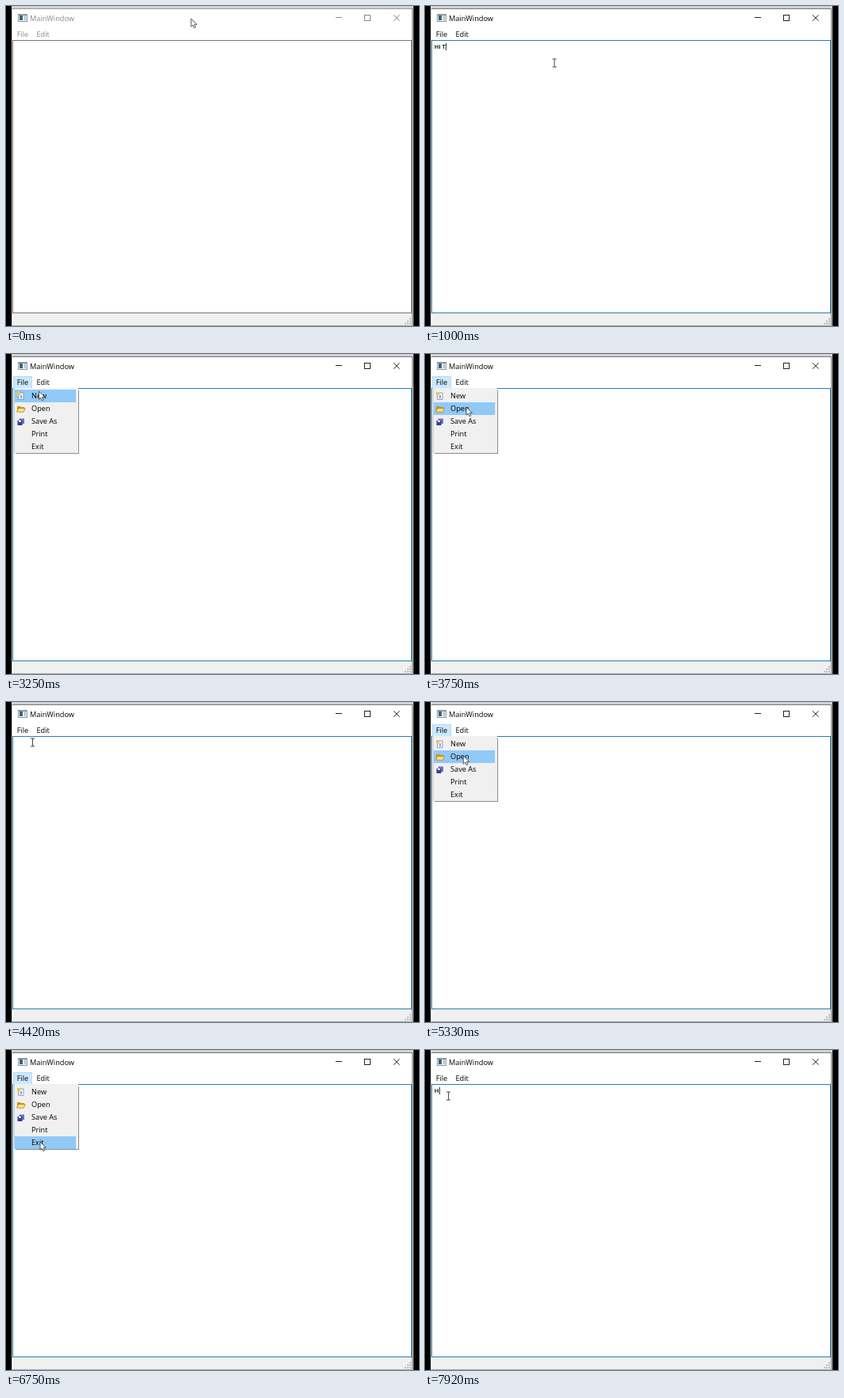
An HTML page for the animation above (8000 ms loop, 520x404 px).

```html
<!DOCTYPE html>
<html lang="en">
<head>
<meta charset="utf-8">
<style>
  html, body { margin: 0; width: 100%; height: 100%; overflow: hidden; background: #000; }
  svg { display: block; width: 520px; height: 404px; }
  text { font: 9.2px "Open Sans", "Noto Sans", sans-serif; fill: #000; white-space: pre; }
  #typed { font-size: 7.6px; font-weight: 600; }
  .crisp { shape-rendering: crispEdges; }
</style>
</head>
<body>
<svg viewBox="0 0 520 404">
  <rect width="520" height="404"/>
  <g class="crisp">
    <rect x="7" width="506" height="404" fill="#fff"/>
    <rect x="7" width="506" height="3" fill="#d2d2d2"/>
    <rect id="topEdge" x="8" y="3" width="504" height="1"/>
    <rect x="7" y="3" width="1" height="401" fill="#c4c4c4"/>
    <rect x="511" y="3" width="1" height="401" fill="#858585"/>
    <rect x="512" y="3" width="1" height="401" fill="#c4c4c4"/>
    <rect x="9" y="388" width="502" height="15" fill="#f0f0f0"/>
    <rect x="8" y="403" width="504" height="1" fill="#aaa"/>
    <g id="grip" fill="#bbb"></g>
    <rect id="focusFrame" x="8.5" y="43.5" width="502" height="344" fill="none"/>
  </g>
  <g class="crisp">
    <rect x="15" y="10" width="12" height="10" fill="#92989c"/>
    <rect x="16" y="12" width="10" height="7" fill="#eef2f4"/>
    <rect x="17" y="12" width="4" height="6" fill="#34687c"/>
    <rect x="23" y="12" width="2" height="6" fill="#b4c5ce"/>
  </g>
  <text id="title" x="30" y="18.7">MainWindow</text>
  <g id="buttons" fill="none">
    <path class="crisp" d="M415 14.5h8M451.5 11.5h7v7h-7z"/>
    <path d="M488 11.3l7.6 7.4M495.6 11.3l-7.6 7.4"/>
  </g>
  <rect id="fileHot" class="crisp" x="9.5" y="28.5" width="23" height="15" fill="#cce8ff" stroke="#b3dcf8"/>
  <text id="fileLabel" x="13.7" y="39">File</text>
  <text id="editLabel" x="38.5" y="39">Edit</text>
  <text id="typed" x="11.7" y="54.3"></text>
  <rect id="caret" class="crisp" y="47" width="1" height="9" fill="#333"/>
  <g id="menu">
    <g class="crisp">
      <rect x="12" y="46" width="80" height="80" fill="#8e8e8e"/>
      <rect x="10" y="43" width="81" height="82" fill="#f0f0f0"/>
      <rect x="10" y="43" width="1" height="82" fill="#ccc"/>
      <rect id="hover" x="11" width="77" height="16" fill="#91c9f7"/>
    </g>
    <g stroke-width=".7">
      <path d="M15.5 49h6.5v8.5h-6.5z" fill="#f4f6ff" stroke="#6b7ba8"/>
      <path d="M14 48h4v4h-4z" fill="#f0c544"/>
      <path d="M18 52h2v4h-2z" fill="#84a8dc"/>
      <path d="M14 66h4l1 1h4v6h-9z" fill="#c89522"/>
      <path d="M13.5 73l2.3-4.5h8.5L22 73.5z" fill="#ffe17b" stroke="#a97c1b"/>
      <path d="M16.5 81.5h6.5v6.5h-6.5z" fill="#6873bb"/>
      <path d="M14.5 84h6v6h-6z" fill="#343f8c"/>
      <path d="M16 84h3v2h-3z" fill="#e8ebfa"/>
    </g>
    <g id="items"></g>
  </g>
  <path id="arrow" d="M0 0V10.2L2.4 8L4 11.6L5.8 10.8L4.2 7.3H7.4Z" fill="#fff" stroke="#444" stroke-width=".9"/>
  <path id="beam" d="M-2.5 -5H2.5M0 -5V5M-2.5 5H2.5" fill="none" stroke="#444"/>
</svg>
<script>
const LOOP = 8000;
const $ = id => document.getElementById(id);
const set = (id, name, value) => $(id).setAttribute(name, value);
const show = (id, on) => set(id, "display", on ? "inline" : "none");

const menuItems = ["New", "Open", "Save As", "Print", "Exit"];
const rowTop = i => 45 + 16 * i;
$("items").innerHTML = menuItems.map((name, i) =>
  `<text x="32" y="${rowTop(i) + 11}">${name}</text>`).join("");

for (let row = 0; row < 3; row++)
  for (let col = 2 - row; col < 3; col++)
    $("grip").innerHTML += `<rect x="${502 + col * 3}" y="${394 + row * 3}" width="2" height="2"/>`;

// Each move ends at its arrival time; the pointer rests in between.
const MOVE_TIME = 330;
const fileButton = [22, 36];
const item = name => {
  const i = menuItems.indexOf(name);
  return [50 - 1.75 * i, rowTop(i) + 7];
};
const moves = [
  { at: 0, to: [233, 16] },
  { at: 580, to: [163, 72] },
  { at: 3080, to: fileButton },
  { at: 3350, to: item("New") },
  { at: 3560, to: fileButton },
  { at: 3750, to: [52, 67] },
  { at: 4000, to: fileButton },
  { at: 4420, to: [33.5, 51] },
  { at: 4920, to: fileButton },
  { at: 5300, to: item("Open") },
  { at: 5920, to: item("Save As") },
  { at: 6400, to: item("Print") },
  { at: 6750, to: item("Exit") },
  { at: 7330, to: fileButton },
  { at: 7660, to: [29.5, 58] }
];

const activation = 250, focusTime = 620;
const typingStart = 750, keyInterval = 72;
const clearTime = 3400, retypeTime = 7920;
const menuTimes = [[3120, clearTime], [3580, 4000], [5000, 7400]];

function pointerAt(t) {
  const i = moves.findLastIndex(move => move.at <= t);
  const from = moves[i], next = moves[i + 1] || { at: LOOP, to: from.to };
  const duration = Math.min(MOVE_TIME, next.at - from.at);
  const p = Math.max(0, 1 - (next.at - t) / duration);
  const ease = p * p * (3 - 2 * p);
  return from.to.map((v, axis) => v + (next.to[axis] - v) * ease);
}

function textAt(t) {
  if (t >= retypeTime) return "H";
  if (t < typingStart || t >= clearTime) return "";
  return "Hi There!".slice(0, 1 + Math.floor((t - typingStart) / keyInterval));
}

function render(t) {
  const [x, y] = pointerAt(t);
  const active = t >= activation, focused = t >= focusTime;
  const menuOpen = menuTimes.some(([start, end]) => t >= start && t < end);
  for (const id of ["title", "fileLabel", "editLabel"])
    $(id).style.fill = active ? "#000" : "#8a8a8a";
  set("buttons", "stroke", active ? "#222" : "#888");
  set("topEdge", "fill", active ? "#777" : "#999");
  set("focusFrame", "stroke", focused ? "#267eae" : "#777");

  show("menu", menuOpen);
  show("fileHot", menuOpen || (active && x < 34 && y > 28 && y < 44));
  const row = Math.floor((y - rowTop(0)) / 16);
  show("hover", row >= 0 && row < menuItems.length);
  set("hover", "y", rowTop(row));

  const typed = $("typed");
  typed.textContent = textAt(t);
  show("caret", focused && !menuOpen && (t + 570) % 1060 < 530);
  set("caret", "x", Math.round(12 + typed.getComputedTextLength()));

  const editing = !menuOpen && y > 44;
  show("arrow", !editing);
  show("beam", editing);
  set(editing ? "beam" : "arrow", "transform", `translate(${x} ${y})`);
}

const start = performance.now();
function tick() {
  render((performance.now() - start) % LOOP);
  requestAnimationFrame(tick);
}
tick();
</script>
</body>
</html>
```
